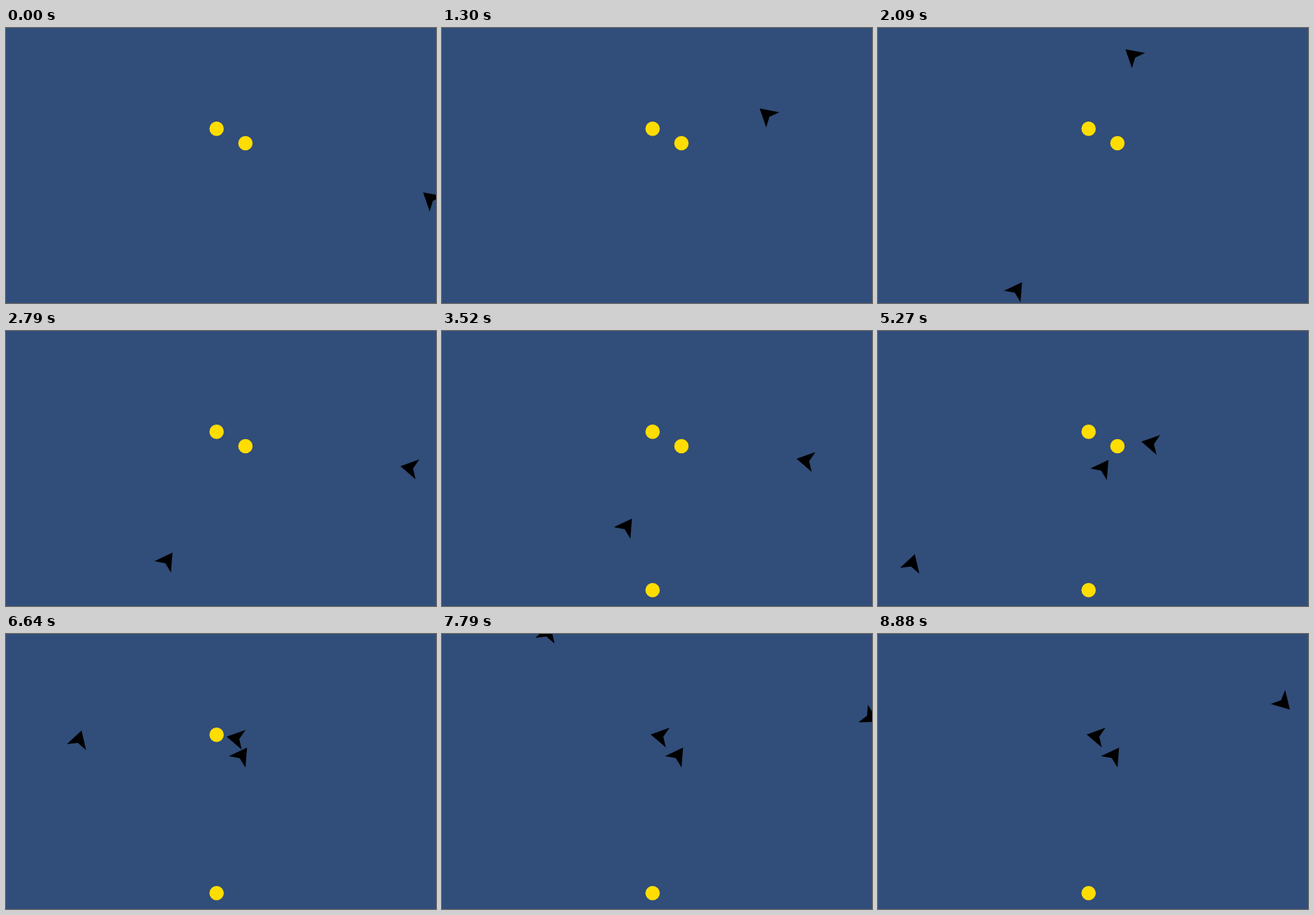
Write an HTML page with a canvas that moves like this. It is 616x394 px and loops after 8.91 s.

```html
<!DOCTYPE html>
<html lang="en">
<head>
<meta charset="utf-8">
<title>Arrows and coins</title>
<style>
  html, body { margin: 0; width: 100%; height: 100%; overflow: hidden; background: #314d79; }
  canvas { display: block; }
</style>
</head>
<body>
<canvas id="stage" width="616" height="394"></canvas>
<script>
const ctx = document.getElementById('stage').getContext('2d');
const LOOP = 8910;
const BRAKE = 132; // braking distance in px

const coins = [
  { x: 301.7, y: 144.4, from: 0, to: 6920 },
  { x: 343, y: 165, from: 0, to: 5850 },
  { x: 301.7, y: 371.3, from: 3140, to: LOOP }
];

const rad = deg => deg * Math.PI / 180;
const mix = (a, b, k) => a + (b - a) * k;

// Distance left to the goal: steady speed, then constant braking from brakeAt.
function distanceLeft(t, speed, brakeAt) {
  const dt = t - brakeAt;
  if (dt < 0) return BRAKE - speed * dt;
  return BRAKE * Math.max(0, 1 - speed * dt / (2 * BRAKE)) ** 2;
}

// Each arrow returns its tip position and heading in degrees.
const seeker = (x, y, deg, speed, brakeAt) => t => {
  const d = distanceLeft(t, speed, brakeAt);
  return [x - d * Math.cos(rad(deg)), y - d * Math.sin(rad(deg)), deg];
};

const cruiser = (x, y, at, vx, vy, deg) => t =>
  [x + vx * (t - at), y + vy * (t - at), deg];

const flyOut = cruiser(355, 31, 2090, -0.1274, -0.1074, 220.8);

// time, centre of the tail, heading
const driftPath = [
  [7330, 632, 136, 12],
  [7790, 603.5, 114, 28],
  [8270, 590, 104.5, 45],
  [8880, 573, 90.5, 46]
];

function drifter(t) {
  if (t < driftPath[0][0]) return null;
  let i = 1;
  while (i < driftPath.length - 1 && t > driftPath[i][0]) i++;
  const a = driftPath[i - 1], b = driftPath[i];
  const k = Math.min(1, (t - a[0]) / (b[0] - a[0]));
  const deg = mix(a[3], b[3], k);
  return [
    mix(a[1], b[1], k) + 24 * Math.cos(rad(deg)),
    mix(a[2], b[2], k) + 24 * Math.sin(rad(deg)),
    deg
  ];
}

const arrows = [
  t => t < 910 ? [598, 236, 220.8] : flyOut(t),
  seeker(345, 163.2, -55.4, 0.081, 3483),
  seeker(299.5, 144, 190.6, 0.0797, 4532),
  cruiser(108, 139, 6640, 0.0405, -0.1325, -73),
  drifter
];

function drawArrow([x, y, deg]) {
  ctx.save();
  ctx.translate(x, y);
  ctx.rotate(rad(deg));
  ctx.beginPath();
  ctx.moveTo(0.6, 0);
  ctx.lineTo(-24.2, 14.4);
  ctx.lineTo(-17.8, 0);
  ctx.lineTo(-24.2, -14.4);
  ctx.fill();
  ctx.restore();
}

function draw(t) {
  ctx.fillStyle = '#314d79';
  ctx.fillRect(0, 0, 616, 394);
  ctx.fillStyle = '#ffdd00';
  for (const c of coins) {
    if (t < c.from || t >= c.to) continue;
    ctx.beginPath();
    ctx.arc(c.x, c.y, 10.3, 0, 2 * Math.PI);
    ctx.fill();
  }
  ctx.fillStyle = '#000';
  for (const arrow of arrows) {
    const pose = arrow(t);
    if (pose) drawArrow(pose);
  }
}

const start = performance.now();
function tick() {
  draw((performance.now() - start) % LOOP);
  requestAnimationFrame(tick);
}
tick();
</script>
</body>
</html>
```
